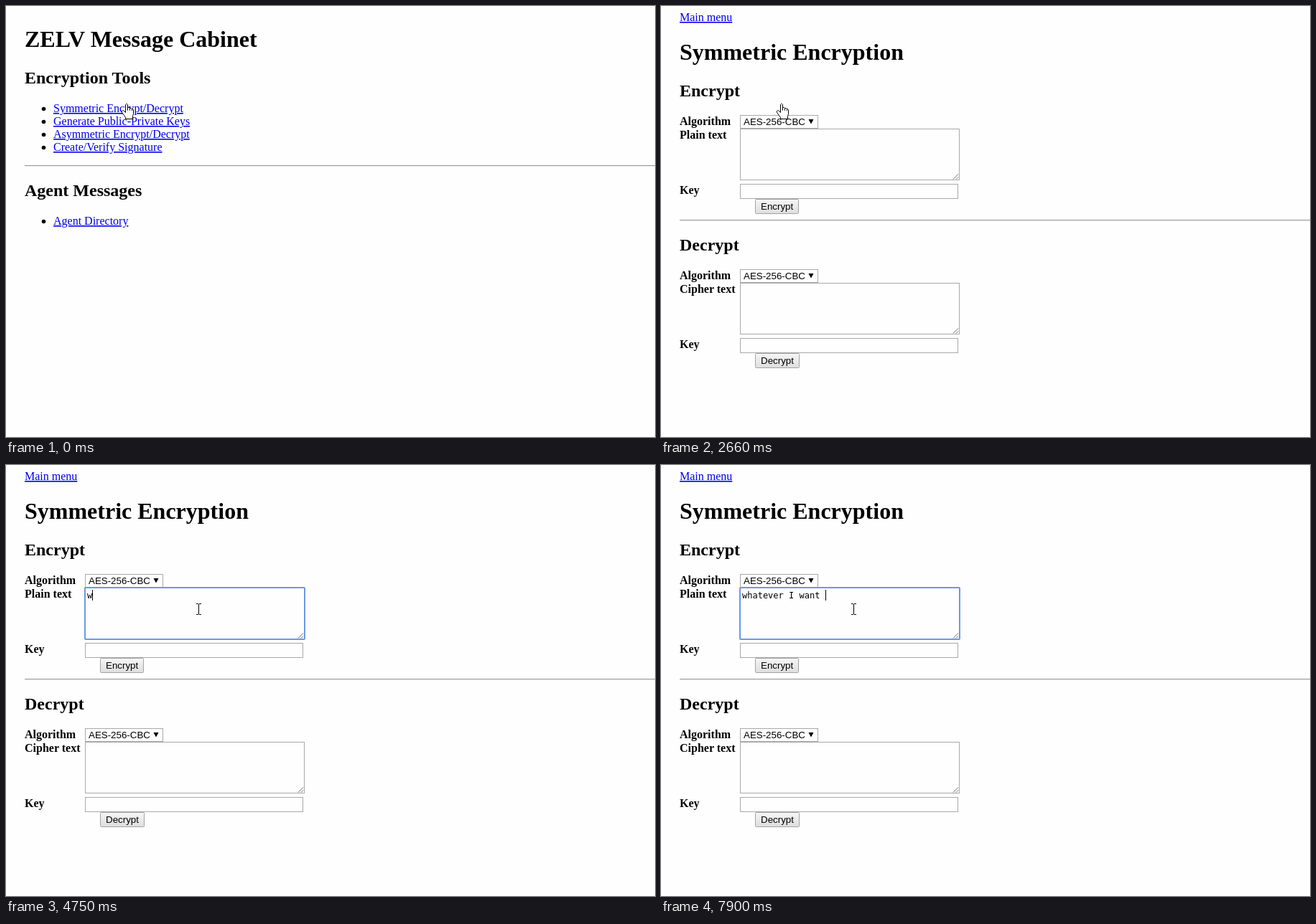
Animation of 904 by 601 pixels, one loop 8 s. Source, as an HTML page:

```html
<!DOCTYPE html>
<html lang="en">
<head>
<meta charset="utf-8">
<title>Message tools</title>
<style>
  html, body { margin: 0; width: 100%; height: 100%; overflow: hidden; background: #fefefe; }
  svg { display: block; width: 904px; height: 601px; }
  text { font: 16px "Liberation Serif", "Times New Roman", serif; }
  .h1 { font-size: 32px; font-weight: bold; }
  .h2 { font-size: 24px; font-weight: bold; }
  .b { font-weight: bold; }
  .link { fill: #00e; text-decoration: underline; }
  .ui { font: 13.333px "Liberation Sans", Arial, sans-serif; }
  .mono { font: 12px "DejaVu Sans Mono", monospace; }
  .field { fill: #fefefe; stroke: #a9a9a9; }
  .cursor { fill: #fff; stroke: #000; }
</style>
</head>
<body>
<svg viewBox="0 0 904 601">
  <defs>
    <linearGradient id="face" x2="0" y2="1">
      <stop stop-color="#f6f6f6"/><stop offset="1" stop-color="#dedede"/>
    </linearGradient>
  </defs>
  <g id="menu"></g>
  <g id="page"></g>
  <g id="focus">
    <rect x="110" y="171" width="306" height="72" rx="1" fill="none" stroke="#6c99e4" stroke-width="2"/>
    <text id="typed" class="mono" x="113" y="186"></text>
    <rect id="caret" y="174" width="1" height="15"/>
  </g>
  <path id="cursor" class="cursor"/>
</svg>
<script>
const $ = id => document.getElementById(id);
const text = (x, y, cls, s) => `<text x="${x}" y="${y}" class="${cls}">${s}</text>`;
const rule = y => `<path d="M26 ${y}.5H904" stroke="#9a9a9a"/><path d="M26 ${y + 1}.5H904" stroke="#eee"/>`;
const box = (x, y, w, h, extra = 'class="field"') =>
  `<rect x="${x + .5}" y="${y + .5}" width="${w - 1}" height="${h - 1}" ${extra}/>`;
const item = (y, s) => `<circle cx="52.5" cy="${y - 4.5}" r="2.8"/>` + text(66, y, 'link', s);

const form = (dy, action, label, width) => `<g transform="translate(0 ${dy})">` +
  text(26, 126, 'h2', action) +
  text(26, 166, 'b', 'Algorithm') + text(26, 185, 'b', label) + text(26, 262, 'b', 'Key') +
  box(110, 152, 109, 19) + text(115, 166, 'ui', 'AES-256-CBC') + '<path d="M205.5 158h7l-3.5 6.5z"/>' +
  box(110, 171, 306, 72) + '<path d="M407 241.5l7-7M411 241.5l3-3" stroke="#666"/>' +
  box(110, 248, 304, 21) +
  box(131, 269, width, 21, 'rx="1" fill="url(#face)" stroke="#a3a3a3"') + text(139, 284, 'ui', action) +
  '</g>';

$('menu').innerHTML =
  text(26, 57, 'h1', 'ZELV Message Cabinet') + text(26, 108, 'h2', 'Encryption Tools') +
  ['Symmetric Encrypt/Decrypt', 'Generate Public-Private Keys', 'Asymmetric Encrypt/Decrypt', 'Create/Verify Signature']
    .map((s, i) => item(148 + 18 * i, s)).join('') +
  rule(222) + text(26, 265, 'h2', 'Agent Messages') + item(305, 'Agent Directory');

$('page').innerHTML =
  text(26, 21, 'link', 'Main menu') + text(26, 75, 'h1', 'Symmetric Encryption') +
  form(0, 'Encrypt', 'Plain text', 61) + rule(298) + form(215, 'Decrypt', 'Cipher text', 62);

const shapes = {
  hand: 'M5.5 12.5V1.5l1-1h1l1 1V9.5V5.5h2l1 1V9.5V6.5h2l1 1V10V7.5h1l1 1V14.5l-1 3V21.5H5.5V19.5L3.5 16.5L.5 12.5V10.5l1-1h1l3 3z',
  arrow: 'M.5.5V16.5L4.5 12.8L7.5 20.5L9.8 19.5L6.8 11.8H11.5z',
  beam: 'M0 .5h3m1 0h3M3.5 1v14M0 15.5h3m1 0h3'
};

// [start, shape, x, y]
const moves = [
  [0, 'hand', 161, 136], [2780, 'arrow', 179, 136], [2940, 'arrow', 325, 141],
  [3090, 'beam', 341, 174], [3210, 'beam', 268, 187], [3360, 'beam', 265, 193]
];

// [start, letters typed, caret x]; x = 0 hides the caret
const phrase = 'whatever I want ';
const keys = [
  [3790, 0, 113], [4330, 0, 0], [4750, 1, 120], [4900, 2, 128], [5180, 4, 142], [5690, 4, 0],
  [5860, 5, 150], [6170, 7, 164], [6320, 8, 172], [6630, 9, 178], [6920, 10, 186], [7050, 11, 193],
  [7200, 12, 201], [7480, 13, 208], [7630, 14, 215], [7750, 15, 223], [7900, 16, 229]
];

const at = (list, t) => list.filter(s => s[0] <= t).pop();
const show = (id, on) => $(id).setAttribute('visibility', on ? 'visible' : 'hidden');

function draw(now) {
  const t = now % 8000;
  const opened = t >= 2660;
  show('menu', !opened);
  show('page', opened);

  const key = at(keys, t);
  $('focus').style.display = key ? '' : 'none';
  if (key) {
    $('typed').textContent = phrase.slice(0, key[1]);
    $('caret').setAttribute('x', key[2]);
    show('caret', key[2]);
  }

  const [, shape, x, y] = at(moves, t);
  $('cursor').setAttribute('d', shapes[shape]);
  $('cursor').setAttribute('transform', `translate(${x} ${y})`);
  requestAnimationFrame(draw);
}
draw(0);
</script>
</body>
</html>
```
